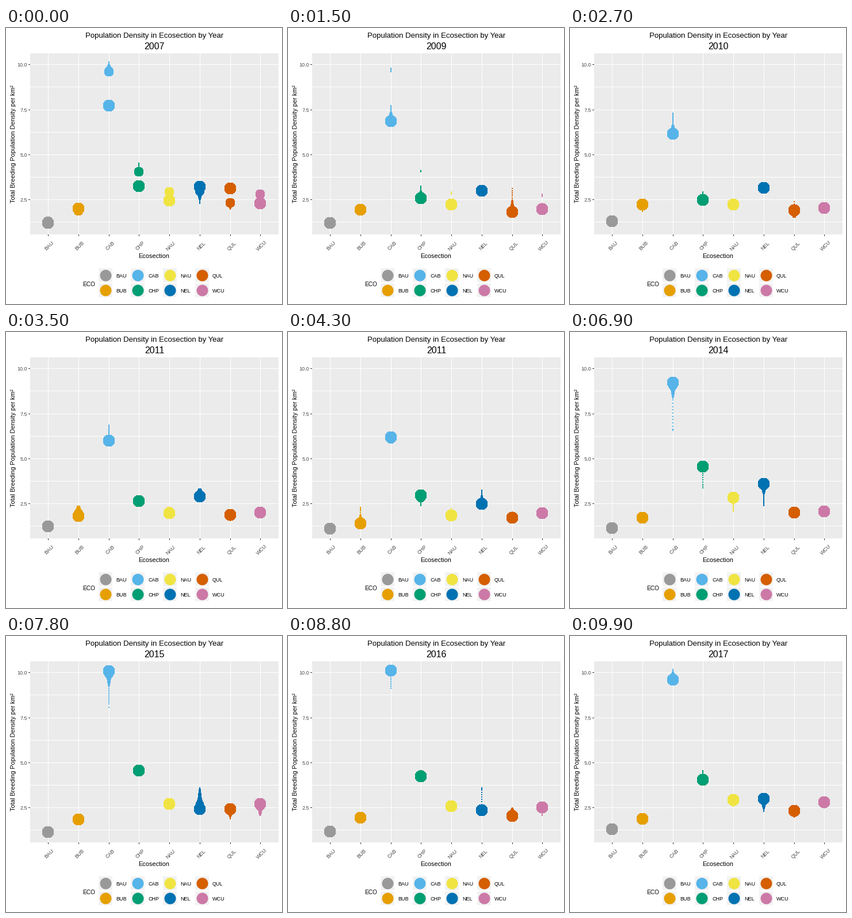
Recreate the animation shown at these times as a matplotlib script. Size 480 px wide and 480 px high, loop 10000 ms.

```python
import numpy as np
import matplotlib.pyplot as plt
from matplotlib.animation import FuncAnimation
from matplotlib.patches import Rectangle

plt.rcParams["font.family"] = "Liberation Sans"

SIZE, DPI = 480, 80
PT = 72 / DPI            # points per pixel
FRAMES, WAKE = 100, 20
FIRST, LAST = 2007, 2017
_ = np.nan               # year on the straight line between its neighbours

# colour and density at the turning years, first to last
GROUPS = {
    "BAU": ("#999999", [1.2, 1.4, 1.05, 1.42, 1.1, _, _, _, _, 1.17, 1.3]),
    "BUB": ("#E69F00", [2, 1.85, _, 2.3, 1.37, _, _, _, _, 1.97, 1.87]),
    "CAB": ("#56B4E9", [7.72, _, _, 5.98, 6, 6.63, 8.26, _, 10.17, 10.1, 9.62]),
    "CHP": ("#009E73", [3.25, _, 2.35, _, 2.74, 3.47, 4.55, _, 4.56, 4.21, 4.05]),
    "NAU": ("#F0E442", [2.47, 2.26, _, 2.22, 1.75, _, _, 2.83, _, 2.57, 2.95]),
    "NEL": ("#0072B2", [3.21, _, 2.93, 3.25, 2.55, 2.39, _, 3.6, 2.31, 2.35, 3]),
    "QUL": ("#D55E00", [3.12, 2.07, 1.56, 2.05, 1.69, _, _, 2, 2.48, 1.99, 2.32]),
    "WCU": ("#CC79A7", [2.29, _, 1.88, 2.12, 1.9, _, 2.34, 2.07, 2.77, 2.48, 2.8]),
}
NAMES = list(GROUPS)
COLORS = [GROUPS[n][0] for n in NAMES]
XS = np.round(73.3 + 52.7 * np.arange(len(NAMES)))


def to_y(density):
    return 377 - 31.33 * density


def path(values):
    values = np.array(values)
    known = ~np.isnan(values)
    keys = np.round(np.linspace(0, FRAMES - 1, len(values)))
    return to_y(np.interp(np.arange(FRAMES), keys[known], values[known]))


PATHS = np.array([path(GROUPS[n][1]) for n in NAMES])

fig = plt.figure(figsize=(SIZE / DPI, SIZE / DPI), dpi=DPI, facecolor="white")
ax = fig.add_axes([0, 0, 1, 1])
ax.set_xlim(0, SIZE)
ax.set_ylim(SIZE, 0)
ax.axis("off")


def label(x, y, text, px, ha="center", color="black", **kw):
    kw.setdefault("va", "baseline")
    return ax.text(x, y, text, fontsize=px * PT, ha=ha, color=color,
                   rotation_mode="anchor", **kw)


def box(x, y, w, h, color):
    ax.add_patch(Rectangle((x, y), w, h, fc=color, lw=0, antialiased=False))


def dots(x, y, radius, colors):
    return ax.scatter(x, y, s=(2 * np.asarray(radius) * PT) ** 2, c=colors,
                      linewidths=0, antialiased=False, zorder=4)


# panel, grid and axes
box(42, 44, 432, 315, "#EBEBEB")
for density in np.arange(1.25, 10.1, 1.25):
    y = int(to_y(density))
    box(42, y, 432, 1, "white")
    if density % 2.5 == 0:
        box(39, y, 3, 1, "#333333")
        label(37, y + 4, f"{density:.1f}", 9, ha="right", color="#4D4D4D")
for x, name in zip(XS, NAMES):
    box(x, 44, 1, 315, "white")
    box(x, 359, 1, 3, "#333333")
    label(x + 2.5, 379, name, 9, color="#4D4D4D", rotation=45, va="center")

label(257.8, 17, "Population Density in Ecosection by Year", 13.2)
year = label(258, 37, str(FIRST), 16)
label(257.5, 400, "Ecosection", 11)
label(16, 202, "Total Breeding Population Density per km²", 10.85, rotation=90)

# legend, filled column by column
label(133, 449, "ECO", 10, ha="left")
for i, name in enumerate(NAMES):
    cx, cy = round(173 + 56.1 * (i // 2)), 430 + 26 * (i % 2)
    box(cx - 12, cy - 12, 24, 24, "#F2F2F2")
    dots([cx], [cy], [10], [COLORS[i]])
    label(cx + 18, cy + 4.5, name, 9, ha="left")

# each point trails its last positions, shrinking to a two-pixel dot
LAGS = np.arange(WAKE, -1, -1)
RADII = np.maximum(1, np.round(0.35 + 9.6 * (1 - LAGS / WAKE) ** 4))
WAKE_XS = np.tile(XS, len(LAGS))
points = dots(WAKE_XS, 0 * WAKE_XS, np.repeat(RADII, len(XS)), COLORS * len(LAGS))


def update(k):
    ys = np.round(PATHS[:, (k - LAGS) % FRAMES].T).ravel()
    points.set_offsets(np.column_stack([WAKE_XS, ys]))
    year.set_text(str(round(FIRST + (LAST - FIRST) * k / (FRAMES - 1))))
    return points, year


anim = FuncAnimation(fig, update, frames=FRAMES, interval=100, repeat=True)
plt.show()
```
